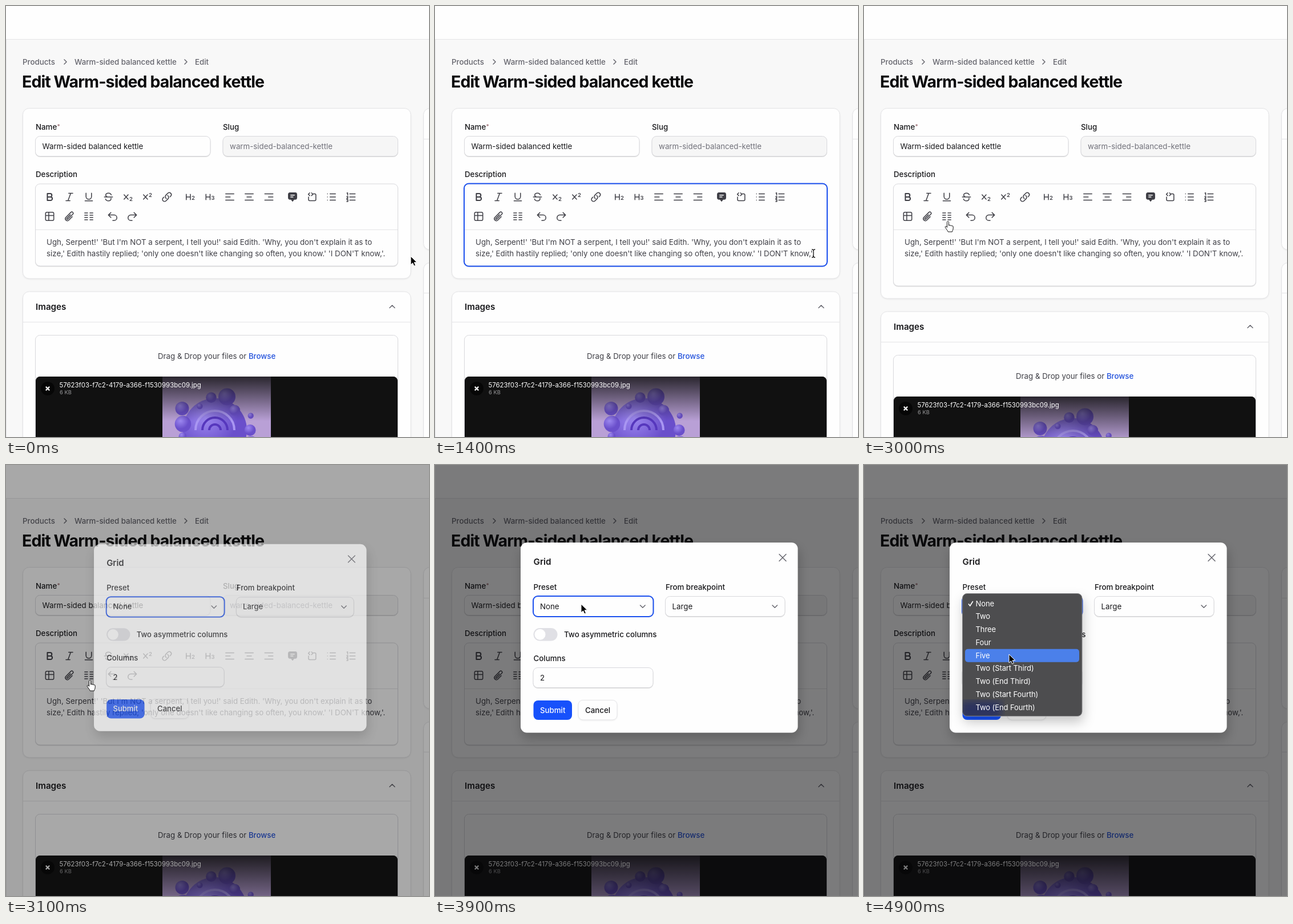
Animation of 741 by 756 pixels, one loop 5000 ms. Source, as an HTML page:

```html
<!DOCTYPE html>
<html lang="en">
<head>
<meta charset="utf-8">
<title>Edit form</title>
<style>
  html, body { margin: 0; width: 100%; height: 100%; overflow: hidden; background: #f8f8f8; }
  svg { display: block; width: 741px; height: 756px; }
  text { font: 400 13.3px Inter, sans-serif; font-optical-sizing: none; fill: #18181b; white-space: pre; }
  .label { font-weight: 500; }
  .crumb { font-weight: 500; fill: #64646c; }
  .title { font-size: 28.5px; font-weight: 700; letter-spacing: -.92px; fill: #09090b; }
  .heading { font-size: 15.2px; font-weight: 600; }
  .muted { fill: #71717a; }
  .body { fill: #3f3f46; }
  .link { fill: #2352dc; font-weight: 500; }
  .white { fill: #fff; }
  .mid { text-anchor: middle; }
  .file { font-size: 11.4px; fill: #fff; }
  .size { font-size: 9.3px; fill: #9a9a9c; }
  .sub { font-size: 9.5px; font-weight: 600; fill: #3f3f46; }
  .menu { font-size: 13px; letter-spacing: -.1px; fill: #fff; }
  .card { fill: #fefefe; stroke: #e4e4e6; filter: drop-shadow(0 1px 1px #0001); }
  .field { fill: #fefefe; stroke: #d8d8dc; filter: drop-shadow(0 1px .6px #0002); }
  .rule { stroke: #e4e4e6; fill: none; }
  .icon { fill: none; stroke: #3f3f46; stroke-width: 1.9; stroke-linecap: round; stroke-linejoin: round; }
  .chevron { fill: none; stroke: #66666e; stroke-width: 1.5; stroke-linecap: round; stroke-linejoin: round; }
  .ring { fill: none; stroke: #1b50ee; stroke-width: 2; }
</style>
</head>
<body>
<svg viewBox="0 0 741 756">
  <defs>
    <linearGradient id="shade" x2="0" y2="1">
      <stop stop-color="#111" stop-opacity=".85"/>
      <stop offset="1" stop-color="#111" stop-opacity="0"/>
    </linearGradient>
    <radialGradient id="ball" cx=".35" cy=".3">
      <stop stop-color="#9d88f0"/>
      <stop offset="1" stop-color="#6a4fcb"/>
    </radialGradient>
    <clipPath id="photo"><rect x="274" y="650" width="190" height="150"/></clipPath>
    <clipPath id="menuBox"><rect x="173" y="226" width="208.5" height="214" rx="8"/></clipPath>
    <filter id="soft"><feGaussianBlur stdDeviation="7"/></filter>
    <filter id="lift" x="-20%" y="-20%" width="140%" height="150%">
      <feDropShadow dy="10" stdDeviation="10" flood-opacity=".22"/>
    </filter>
  </defs>

  <rect width="741" height="756" fill="#f8f8f8"/>
  <rect width="741" height="58" fill="#fefefe"/>
  <path class="rule" d="M0 58.5h741M.5 59v697"/>

  <text class="crumb" x="29" y="103">Products</text>
  <text class="crumb" x="120" y="103">Warm-sided balanced kettle</text>
  <text class="crumb" x="331" y="103">Edit</text>
  <path class="chevron" d="M102 94l4 4-4 4M313 94l4 4-4 4"/>
  <text class="title" x="28" y="143">Edit Warm-sided balanced kettle</text>

  <rect class="card" x="731.5" y="179.5" width="60" height="248" rx="11"/>
  <rect class="card" x="731.5" y="450.5" width="60" height="400" rx="11"/>
  <path class="rule" d="M732 233.5h9M732 503.5h9"/>

  <rect id="card" class="card" x="29.5" y="179.5" width="679.5" height="298.5" rx="11"/>
  <text class="label" x="52" y="217">Name</text>
  <text class="label" x="89.5" y="215" style="font-size:10px;fill:#95666b">*</text>
  <text class="label" x="380" y="217">Slug</text>
  <rect class="field" x="51.5" y="228.5" width="306.5" height="35" rx="8"/>
  <rect class="field" x="380" y="228.5" width="306.5" height="35" rx="8" style="fill:#f6f6f6"/>
  <text x="63.5" y="251">Warm-sided balanced kettle</text>
  <text class="muted" x="392" y="251">warm-sided-balanced-kettle</text>
  <text class="label" x="52" y="300">Description</text>
  <rect id="editor" class="field" x="51.5" y="312" width="635" height="144" rx="8"/>
  <path class="rule" d="M52 392.5h634"/>
  <g id="tools"></g>
  <text class="body" x="71" y="419">Ugh, Serpent!' 'But I'm NOT a serpent, I tell you!' said Edith. 'Why, you don't explain it as to</text>
  <text class="body" x="71" y="439">size,' Edith hastily replied; 'only one doesn't like changing so often, you know.' 'I DON'T know,'.</text>
  <path id="caret" d="M71.5 461v16" stroke="#18181b"/>
  <rect id="focus" class="ring" x="51" y="311.5" width="636" height="145" rx="8"/>

  <g id="lower">
    <rect class="card" x="29.5" y="501" width="679.5" height="400" rx="11"/>
    <path class="rule" d="M30 554.5h679"/>
    <text class="heading" x="52" y="532.5">Images</text>
    <path class="chevron" d="M672 529.5l4.5-4.5 4.5 4.5"/>
    <rect class="field" x="51.5" y="577.5" width="635" height="300" rx="8"/>
    <text class="body" x="266" y="619">Drag &amp; Drop your files or <tspan class="link">Browse</tspan></text>
    <rect x="52" y="650" width="634" height="200" rx="8" fill="#111"/>
    <g id="art" clip-path="url(#photo)"><rect x="274" y="650" width="190" height="150" fill="#b9a0d6"/></g>
    <rect x="52" y="650" width="634" height="78" rx="8" fill="url(#shade)"/>
    <circle cx="73" cy="671" r="12" fill="#000" opacity=".6"/>
    <path d="M69.8 667.8l6.4 6.4m0-6.4l-6.4 6.4" stroke="#fff" stroke-width="2.2"/>
    <text class="file" x="93.5" y="669">57623f03-f7c2-4179-a366-f1530993bc09.jpg</text>
    <text class="size" x="94" y="681">6 KB</text>
  </g>

  <rect id="dim" width="741" height="756" fill="#09090b"/>

  <g id="modal">
    <rect x="150" y="136" width="485.5" height="333.5" rx="11" fill="#fefefe" filter="url(#lift)"/>
    <text class="heading" x="172.5" y="175">Grid</text>
    <path class="chevron" d="M603 156.5l12 12m0-12l-12 12"/>
    <text class="label" x="172.5" y="218.5">Preset</text>
    <text class="label" x="404" y="218.5">From breakpoint</text>
    <rect class="field" x="172" y="230.5" width="210" height="35" rx="8"/>
    <rect class="ring" x="172" y="230" width="210.5" height="36" rx="8"/>
    <rect class="field" x="403.5" y="230.5" width="209.5" height="35" rx="8"/>
    <text x="184" y="252.5">None</text>
    <text x="415.5" y="252.5">Large</text>
    <path class="chevron" d="M359.5 246l4.3 4.3 4.3-4.3M591 246l4.3 4.3 4.3-4.3"/>
    <rect x="172.5" y="286" width="42" height="22.5" rx="11.3" fill="#e0e0e5"/>
    <circle cx="184" cy="297.2" r="9.5" fill="#fff"/>
    <text class="label" x="226" y="302">Two asymmetric columns</text>
    <text class="label" x="172.5" y="343.5">Columns</text>
    <rect class="field" x="172" y="355.5" width="210" height="35" rx="8"/>
    <text x="184" y="378">2</text>
    <rect x="172.5" y="413" width="67.5" height="34" rx="8" fill="#1751fb"/>
    <text class="label white mid" x="206.2" y="434.5">Submit</text>
    <rect class="card" x="251" y="412.5" width="68" height="34.5" rx="8"/>
    <text class="label mid" x="285" y="434.5">Cancel</text>
  </g>

  <g id="menu">
    <rect x="172.5" y="225.5" width="209.5" height="215" rx="8" fill="#4d4d4f" stroke="#858587" filter="url(#lift)"/>
    <g clip-path="url(#menuBox)"><rect x="170" y="414" width="70" height="30" fill="#29315f" filter="url(#soft)"/></g>
    <rect id="hover" x="177" width="200" height="23" rx="5" fill="#4b80ea"/>
    <path d="M183 243.5l2.8 3.5 5-8" fill="none" stroke="#fff" stroke-width="1.6"/>
  </g>

  <g id="cursor">
    <path d="M0 0v15l3.5-3.3 2.3 5.3 2.6-1.1-2.3-5.2h4.8z" fill="#000" stroke="#fff"/>
    <path d="M-3-7q3 0 3 2v10q0 2-3 2M3-7q-3 0-3 2M0 5q0 2 3 2" fill="none" stroke="#111" stroke-width="1.3"/>
    <path d="M-1.5 1.2c0-2 3-2 3 0v6c.3-1.4 2.8-1.2 2.8.3.4-1 2.6-.8 2.6.6.5-.8 2.3-.5 2.3 1v3c0 3-1.5 3.5-1.7 6H.2c-.5-2.5-3.6-5-4.9-8-.6-1.5 1.4-2.4 2.4-1l.8 1.2z" fill="#fff" stroke="#111" stroke-linejoin="round"/>
  </g>
</svg>

<script>
const $ = id => document.getElementById(id);
const add = (id, markup) => $(id).insertAdjacentHTML('beforeend', markup);

// Toolbar icons on a 24-unit grid: centre x, centre y, path
const lines = 'M9 5h12M9 12h12M9 19h12';
const cross = 'M3 7l9 10M12 7L3 17';
const letterH = 'M3 6v12M12 6v12M3 12h9';
const icons = [
  [111, 335, 'M10.5 4h9M4.5 20h9M15 4L9 20'],
  [145, 335, 'M6 3.5v7.5a6 6 0 0 0 12 0V3.5M3.8 20.5h16.4'],
  [179.5, 335, 'M3 12h18M18 7.5c-.6-2.6-3-4-6-4-3.5 0-6 1.6-6 4.3 0 2 1.3 3.3 4 4.2M17.5 14.5c.9 3.5-1.6 6-5.5 6-3.2 0-5.6-1.4-6.2-4'],
  [214, 335, cross], [248, 335, cross],
  [282, 335, 'M13.2 8.7a4.5 4.5 0 0 1 1.2 7.2l-4.5 4.5a4.5 4.5 0 0 1-6.4-6.4l1.8-1.7m13.4-.6l1.7-1.8a4.5 4.5 0 0 0-6.4-6.3l-4.5 4.5a4.5 4.5 0 0 0 1.3 7.2'],
  [323, 335, letterH], [357.5, 335, letterH],
  [392, 335, 'M3 5h18M3 12h10M3 19h18'],
  [426, 335, 'M3 5h18M7 12h10M3 19h18'],
  [460.5, 335, 'M3 5h18M11 12h10M3 19h18'],
  [536, 335, 'M15 5h3a2.5 2.5 0 0 1 2.5 2.5v10A2.5 2.5 0 0 1 18 20H7a2.5 2.5 0 0 1-2.5-2.5V12M7 3L4 6l3 3M11 3l3 3-3 3'],
  [570, 335, lines + 'M3.5 5h.01M3.5 12h.01M3.5 19h.01'],
  [604.5, 335, lines + 'M3 3.5L4.5 3v5M2.5 11H5v1.5l-2.5 3H5M2.5 18H5v4H2.5'],
  [76.5, 369, 'M3 5.5A2.5 2.5 0 0 1 5.5 3h13A2.5 2.5 0 0 1 21 5.5v13a2.5 2.5 0 0 1-2.5 2.5h-13A2.5 2.5 0 0 1 3 18.5zM3 10h18M10 3v18'],
  [111, 369, 'M18.4 12.7l-7.7 7.7a4.5 4.5 0 0 1-6.4-6.3L15.3 3.1a3 3 0 1 1 4.2 4.3L8.6 18.3a1.5 1.5 0 0 1-2.1-2.1l7.8-7.8'],
  [145, 369, [4.5, 9.5, 14.5, 19.5].map(y => `M3 ${y}h6.5M14.5 ${y}H21`).join('')],
  [187, 369, 'M8 14.5L2.5 9 8 3.5M3 9h12a6 6 0 0 1 0 12h-3'],
  [221, 369, 'M16 14.5L21.5 9 16 3.5M21 9H9a6 6 0 0 0 0 12h3'],
];
const icon = (x, y, d, style = '') =>
  `<path class="icon" transform="translate(${x} ${y}) scale(.8) translate(-12 -12)" d="${d}" style="${style}"/>`;
const sub = (x, y, s) => `<text class="sub" x="${x}" y="${y}">${s}</text>`;
add('tools', icons.map(i => icon(...i)).join('')
  + icon(76.5, 335, 'M7 4.5h6a3.75 3.75 0 0 1 0 7.5H7zM7 12h7a3.75 3.75 0 0 1 0 7.5H7z', 'stroke-width:2.6')
  + icon(502, 335, 'M3 6a3 3 0 0 1 3-3h12a3 3 0 0 1 3 3v8a3 3 0 0 1-3 3h-3l-3 4-3-4H6a3 3 0 0 1-3-3z', 'fill:#3f3f46')
  + icon(502, 335, 'M8 8h8M8 12h5', 'stroke:#fff')
  + sub(216, 342, 2) + sub(250, 335, 2) + sub(325, 340, 2) + sub(359.5, 340, 3));

// Picture: ring of balls around a swirl
const ball = (x, y, r) => `<circle cx="${x}" cy="${y}" r="${r}" fill="url(#ball)"/>`;
let swirl = ball(366, 744, 56);
for (let i = 0; i < 15; i++) {
  const a = i * .419, d = 56 + 9 * Math.sin(i * 2.3);
  swirl += ball(366 + d * 1.1 * Math.cos(a), 744 + d * Math.sin(a), 10 + 5 * Math.sin(i * 1.7));
}
for (let r = 10; r < 46; r += 12)
  swirl += `<path d="M${366 - r} 744a${r} ${r} 0 0 1 ${2 * r} 0" fill="none" stroke="${r > 30 ? '#a996f2' : '#5637bd'}" stroke-width="4"/>`;
add('art', swirl);

const options = ['None', 'Two', 'Three', 'Four', 'Five', 'Two (Start Third)', 'Two (End Third)', 'Two (Start Fourth)', 'Two (End Fourth)'];
const rowHeight = 22.75;
add('menu', options.map((s, i) => `<text class="menu" x="195.5" y="${247.7 + i * rowHeight}">${s}</text>`).join(''));

// Pointer path: time, x, y
const path = [
  [0, 709, 439], [700, 663, 434], [1900, 663, 434], [2300, 195, 394], [2600, 147, 378],
  [3400, 147, 378], [3900, 256, 244], [4000, 256, 245], [4700, 256, 245], [4900, 254, 332], [5000, 254, 332],
];
function pointerAt(t) {
  const i = path.findIndex(p => p[0] > t);
  const [t0, x0, y0] = path[i - 1], [t1, x1, y1] = path[i];
  const u = (t - t0) / (t1 - t0), k = u * u * (3 - 2 * u);
  return [x0 + (x1 - x0) * k, y0 + (y1 - y0) * k];
}
const show = (el, on) => el.setAttribute('display', on ? 'inline' : 'none');

function draw(t) {
  const grow = t >= 1700 ? 35 : 0;
  $('card').setAttribute('height', 298.5 + grow);
  $('editor').setAttribute('height', 144 + grow);
  $('focus').setAttribute('height', 145 + grow);
  $('lower').setAttribute('transform', `translate(0 ${grow})`);
  show($('focus'), t >= 800 && t < 3000);
  show($('caret'), t >= 1700 && t < 2200);

  const open = 1 - (1 - Math.min(1, Math.max(0, (t - 3000) / 300))) ** 2.7;
  $('dim').setAttribute('opacity', open * .53);
  $('modal').setAttribute('opacity', open);
  $('modal').setAttribute('transform', `translate(392.8 303) scale(${.95 + .05 * open}) translate(-392.8 -303)`);

  const [x, y] = pointerAt(t);
  const shape = t >= 2600 && t < 3500 ? 2 : t < 2300 && x < 686 && y > 396 ? 1 : 0;
  $('cursor').setAttribute('transform', `translate(${x} ${y})`);
  [...$('cursor').children].forEach((el, i) => show(el, i === shape));

  show($('menu'), t >= 4200);
  $('hover').setAttribute('y', 231.8 + Math.round((y - 243) / rowHeight) * rowHeight);
}

function tick() {
  draw(Math.floor(performance.now() % 5000 / 100) * 100);
  requestAnimationFrame(tick);
}
tick();
</script>
</body>
</html>
```
